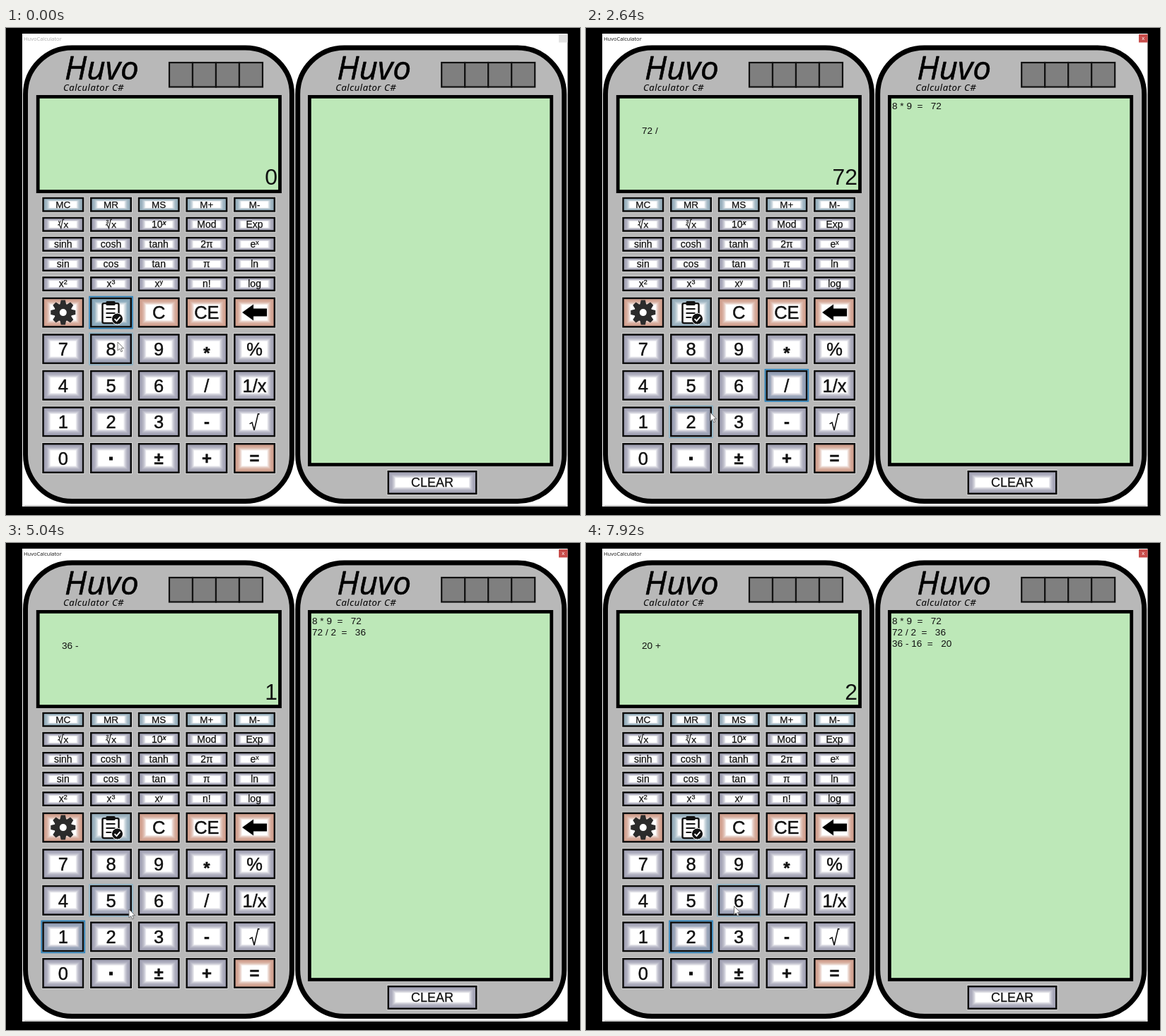
Write an HTML page that moves like this. It is 812x690 px and loops after 8 s.

```html
<!DOCTYPE html>
<html lang="en">
<head>
<meta charset="utf-8">
<title>HuvoCalculator</title>
<style>
html, body { margin: 0; width: 100%; height: 100%; overflow: hidden; background: #000; }
svg { display: block; width: 812px; height: 690px; }
text { font-family: "Liberation Sans", Arial, sans-serif; fill: #111; white-space: pre; }
.key { text-anchor: middle; stroke: #111; stroke-width: .25px; }
.big { stroke-width: .45px; }
.brand { font-family: "Open Sans", "Noto Sans", sans-serif; font-style: italic; fill: #000; stroke: #000; stroke-linejoin: round; }
.bar { font-family: "Open Sans", sans-serif; }
</style>
</head>
<body>
<svg id="stage" viewBox="0 0 812 690"></svg>
<script>
const LOOP = 8000, STEP = 80;
const stage = document.getElementById('stage');
const keys = [];

const rect = (x, y, w, h, fill, extra = '') =>
  `<rect x="${x}" y="${y}" width="${w}" height="${h}" fill="${fill}" ${extra}/>`;
const path = (d, fill, extra = '') => `<path d="${d}" fill="${fill}" ${extra}/>`;
const text = (x, y, size, s, extra = '') =>
  `<text x="${x}" y="${y}" font-size="${size}" ${extra}>${s}</text>`;

const LILAC = [163, 163, 181], SALMON = [208, 159, 142], BLUE = [149, 173, 187];
const fade = (c, k) => `rgb(${c.map(v => Math.round(v + (255 - v) * k))})`;

// Rings that brighten from the edge to a white centre
function bevel(x, y, w, h, dx, dy, tone) {
  const n = 8;
  let out = '';
  for (let i = 0; i <= n; i++) {
    const k = i / n;
    out += rect(x + dx * k, y + dy * k, w - 2 * dx * k, h - 2 * dy * k, fade(tone, k ** 2));
  }
  return out;
}

function button(id, x, y, w, h, tone, label) {
  const tall = h > 30;
  keys.push({ id, x, y, w, h });
  return rect(x - 1, y - 1, w + 2, h + 2, '#d6d6d6') +
    rect(x, y, w, h, '#0c0c0c') +
    bevel(x + 2.5, y + 2.5, w - 5, h - 5, tall ? 9 : 8, tall ? 8 : 3.5, tone) +
    rect(x + 5, y + 5, w - 10, h - 10, 'none', `id="tint${keys.length - 1}" stroke="#397ca6" stroke-width="5" opacity="0"`) +
    rect(x - 1, y - 1, w + 2, h + 2, 'none', `id="edge${keys.length - 1}" opacity="0"`) +
    label;
}

const sup = (base, top, style = '') =>
  `${base}<tspan dy="-4" font-size="9" ${style}>${top}</tspan>`;

const root = (cx, cy, n) =>
  text(cx - 5, cy - 1.5, 7, n, 'class="key"') +
  path(`M${cx - 7.5} ${cy + 1}l2 -1l2.5 5.5l2.5 -12.5h2`, 'none', 'stroke="#111" stroke-width="1.1"') +
  text(cx + 4, cy + 5, 13.5, 'x', 'class="key"');

function gear(cx, cy) {
  let teeth = '';
  for (let a = 0; a < 360; a += 45)
    teeth += path('M-4.5 -11L-3 -17.5H3L4.5 -11Z', '#2b2b2b', `transform="translate(${cx} ${cy}) rotate(${a})"`);
  return teeth + `<circle cx="${cx}" cy="${cy}" r="8.8" fill="#fff" stroke="#2b2b2b" stroke-width="7.6"/>`;
}

const clipboard = (x, y) =>
  rect(x - 12, y - 13, 23, 28, '#fff', 'rx="2" stroke="#111" stroke-width="2.4"') +
  rect(x - 7, y - 16, 13, 6, '#111', 'rx="1.5"') +
  path(`M${x - 7} ${y - 5}h13m-13 6h13m-13 6h8`, 'none', 'stroke="#111" stroke-width="2"') +
  `<circle cx="${x + 9}" cy="${y + 9}" r="8" fill="#111" stroke="#fff"/>` +
  path(`M${x + 5} ${y + 9}l3 3l5 -6`, 'none', 'stroke="#fff" stroke-width="1.8"');

const arrow = (x, y) =>
  path(`M${x - 17.5} ${y}l16 -11.5v6h19v11h-19v6Z`, '#000');

const column = i => 51.3 + i * 67.7;

function smallKeys() {
  const rows = [
    ['MC', 'MR', 'MS', 'M+', 'M-'],
    ['y√x', '3√x', sup('10', 'x', 'font-weight="bold" font-style="italic"'), 'Mod', 'Exp'],
    ['sinh', 'cosh', 'tanh', '2π', sup('e', 'x')],
    ['sin', 'cos', 'tan', 'π', 'ln'],
    [sup('x', '2'), sup('x', '3'), sup('x', 'y'), 'n!', 'log']
  ];
  return rows.map((row, r) => row.map((s, c) => {
    const x = column(c), y = 239.7 + r * 28.1, cx = x + 29.5, cy = y + 10.5;
    const label = s.includes('√') ? root(cx, cy, s[0])
      : text(cx, cy + 4.8, r ? 14 : 13.5, s, 'class="key"');
    return button(s, x, y, 59, 21, r ? LILAC : BLUE, label);
  }).join('')).join('');
}

function largeKeys() {
  const rows = [
    ['gear', 'list', 'C', 'CE', 'back'],
    ['7', '8', '9', '*', '%'],
    ['4', '5', '6', '/', '1/x'],
    ['1', '2', '3', '-', '√'],
    ['0', '.', '±', '+', '=']
  ];
  const icons = {
    gear, list: clipboard, back: arrow,
    '.': (x, y) => rect(x - 2.5, y - 2, 5, 5, '#111'),
    '√': (x, y) => path(`M${x - 7} ${y + 3}l3.5 -2l3 11l5.5 -23h2`, 'none', 'stroke="#111" stroke-width="1.6"')
  };
  const bold = '*-±+=';
  return rows.map((row, r) => row.map((s, c) => {
    const x = column(c), y = 381.6 + r * 51.6, cx = x + 29.5, cy = y + 21.5;
    const tone = s === 'list' ? BLUE : r === 0 || s === '=' ? SALMON : LILAC;
    const weight = bold.includes(s) ? 'font-weight="bold"' : '';
    const label = icons[s] ? icons[s](cx, cy)
      : text(cx, cy + (s === '*' ? 14.5 : bold.includes(s) ? 8 : 9.3), weight ? 24 : 25.5, s, `class="key big" ${weight}`);
    return button(s, x, y, 59, 43, tone, label);
  }).join('')).join('');
}

function panel(dx, screenX, screenH) {
  let cells = '';
  for (let i = 0; i < 4; i++)
    cells += rect(231 + i * 33, 49, 33, 34.5, '#7f7f7f', 'stroke="#111" stroke-width="2.2"');
  return `<g transform="translate(${dx} 0)">` +
    rect(27.5, 28, 377, 642.5, '#b8b8b8', 'rx="66" stroke="#000" stroke-width="7"') +
    text(83, 72.5, 46, 'Huvo', 'class="brand" stroke-width=".6"') +
    text(81, 88.5, 13, 'Calculator C#', 'class="brand" font-weight="500" letter-spacing=".6" stroke-width=".1"') +
    cells +
    rect(screenX, 97.4, 342.3, screenH, '#bde8b8', 'stroke="#000" stroke-width="4.8"') + '</g>';
}

stage.innerHTML =
  rect(0, 0, 812, 690, '#000') + rect(23, 8, 771.5, 670, '#fff') +
  rect(26, 676, 766, 1.5, '#c4c4c4') +
  text(25, 18, 7.5, 'HuvoCalculator', 'id="title" class="bar"') +
  rect(782, 9, 12.5, 11.5, '#c84d4b', 'id="close"') +
  text(788.2, 17, 8, 'x', 'id="cross" text-anchor="middle" style="fill:#fff"') +
  panel(0, 45.2, 134.2) + panel(385.2, 44.2, 521.2) +
  text(79, 150, 13.6, '', 'id="expr"') +
  text(384, 222, 32, '0', 'id="value" text-anchor="end"') +
  [0, 1, 2].map(i => text(433, 115 + 16 * i, 13.6, '', `id="line${i}"`)).join('') +
  smallKeys() + largeKeys() +
  button('clear', 539.5, 627, 127, 34, LILAC, text(603, 650.3, 18, 'CLEAR', 'class="key"')) +
  path('M0 0V12L2.8 9.5L4.8 13.8L6.7 13L4.8 8.8H8.5Z', '#fff', 'id="cursor" stroke="#666" stroke-width=".9"');

const $ = id => document.getElementById(id);

// time, focused key, value, pending expression, finished lines
const states = [
  [0, 'list', '0', '', 0],
  [320, '8', '8', '', 0],
  [800, '*', '8', '8 *', 0],
  [1280, '9', '9', '8 *', 0],
  [1840, '/', '72', '72 /', 1],
  [2880, '2', '2', '72 /', 1],
  [3760, '-', '36', '36 -', 2],
  [4640, '1', '1', '36 -', 2],
  [5440, '6', '16', '36 -', 2],
  [6320, '+', '20', '20 +', 3],
  [7440, '2', '2', '20 +', 3]
];
const history = ['8 * 9  =   72', '72 / 2  =   36', '36 - 16  =   20'];

const route = [
  [0, 158, 445], [320, 158, 448], [640, 284, 460], [880, 284, 460],
  [1120, 222, 458], [1360, 222, 458], [1600, 266.5, 499.5], [1760, 280, 508],
  [1920, 280, 508], [2640, 176, 545], [2800, 158, 555], [2960, 158, 556],
  [3600, 281, 566], [3840, 281, 566], [4400, 88, 560], [4720, 88, 560],
  [5040, 174, 519], [5280, 213, 510], [5520, 213, 512], [5920, 301, 619],
  [6480, 298, 619], [7200, 152, 561], [7600, 152, 561], [7920, 209.5, 514.5], [8000, 211, 512]
];

function cursorAt(t) {
  const i = Math.max(1, route.findIndex(p => p[0] > t));
  const [t0, x0, y0] = route[i - 1], [t1, x1, y1] = route[i];
  const u = (t - t0) / (t1 - t0), k = u * u * (3 - 2 * u);
  return [x0 + (x1 - x0) * k, y0 + (y1 - y0) * k];
}

function draw(t) {
  const [, focus, value, expr, done] = states.filter(s => s[0] <= t).pop();
  const active = focus !== 'list';
  const [mx, my] = cursorAt(t);

  $('title').style.fill = active ? '#111' : '#aaa';
  $('close').setAttribute('fill', active ? '#c84d4b' : '#e2e2e2');
  $('cross').style.opacity = active ? 1 : 0;
  $('value').textContent = value;
  $('expr').textContent = expr;
  history.forEach((s, i) => { $('line' + i).textContent = i < done ? s : ''; });
  $('cursor').setAttribute('transform', `translate(${mx} ${my})`);

  keys.forEach((k, i) => {
    const focused = k.id === focus;
    const over = mx >= k.x && mx <= k.x + k.w && my >= k.y && my <= k.y + k.h;
    const edge = $('edge' + i);
    edge.setAttribute('opacity', focused || over ? 1 : 0);
    edge.setAttribute('stroke', focused ? '#2681bd' : '#77afca');
    edge.setAttribute('stroke-width', focused ? 1.6 : 1.1);
    $('tint' + i).setAttribute('opacity', focused ? .16 : over ? .07 : 0);
  });
}

const start = performance.now();
function tick() {
  const t = (performance.now() - start) % LOOP;
  draw(Math.floor(t / STEP) * STEP);
  requestAnimationFrame(tick);
}
tick();
</script>
</body>
</html>
```
